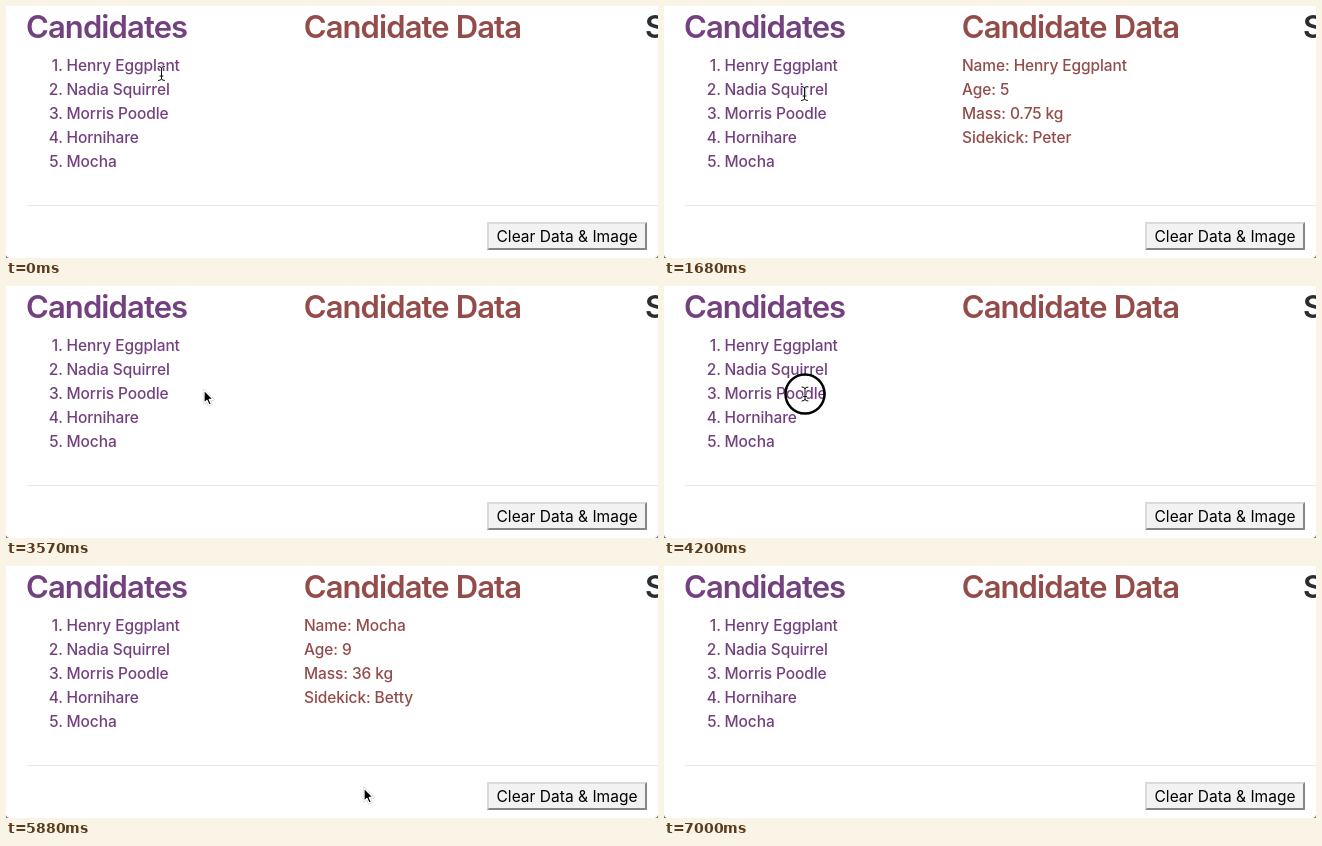
Animation of 652x252 px, one loop 7.35 s. Source, as an HTML page:

```html
<!DOCTYPE html>
<html lang="en">
<head>
<meta charset="utf-8">
<title>Candidates</title>
<style>
  html, body { margin: 0; width: 100%; height: 100%; overflow: hidden; background: #fff; }
  svg { display: block; width: 652px; height: 252px; }
  text { font: 500 15.5px Inter, Roboto, sans-serif; letter-spacing: -.1px; white-space: pre; }
  .head { font-size: 31px; font-weight: 600; letter-spacing: -.9px; }
  .button { font-weight: 400; letter-spacing: .02px; }
  .list { fill: #744180; }
  .data { fill: #944c4a; }
  .num { text-anchor: end; }
</style>
</head>
<body>
<svg viewBox="0 0 652 252" xmlns="http://www.w3.org/2000/svg">
  <rect width="652" height="252" fill="#fff"/>
  <text class="head list" x="20" y="32">Candidates</text>
  <text class="head data" x="297.7" y="32">Candidate Data</text>
  <text class="head" x="638.9" y="32" fill="#2b2e31">S</text>
  <g id="list" class="list"></g>
  <g id="data" class="data"></g>
  <rect x="21" y="199" width="631" height="1" fill="#e8e8e8"/>
  <g>
    <rect x="481" y="216" width="160" height="28" fill="#f2f2f2"/>
    <path id="edgeA" d="M481 244V216H641L639 218H483V242Z"/>
    <path id="edgeB" d="M641 216V244H481L483 242H639V218Z"/>
    <text class="button" x="561" y="236" text-anchor="middle">Clear Data &amp; Image</text>
  </g>
  <path d="M0 249Q.5 251.5 3 252H0ZM652 249Q651.5 251.5 649 252H652Z" fill="#777"/>
  <circle id="ring" r="19.5" fill="none" stroke="#000" stroke-width="2.5"/>
  <g id="arrow" stroke-linejoin="round">
    <path d="M0 0V13.2L3 10.4L5.1 15.2L7.4 14.2L5.3 9.5H9.4Z" fill="none" stroke="#000" stroke-width="2.4" opacity=".2"/>
    <path d="M0 0V13.2L3 10.4L5.1 15.2L7.4 14.2L5.3 9.5H9.4Z" fill="#000" stroke="#fff" stroke-width="1.3"/>
  </g>
  <g id="beam" fill="none" stroke-linecap="round">
    <path d="M-3 -7Q0 -7 0 -5Q0 -7 3 -7M0 -5V5M-3 7Q0 7 0 5Q0 7 3 7M-1.5 2.5H1.5" stroke="#fff" stroke-width="2.6" opacity=".8"/>
    <path d="M-3 -7Q0 -7 0 -5Q0 -7 3 -7M0 -5V5M-3 7Q0 7 0 5Q0 7 3 7M-1.5 2.5H1.5" stroke="#111" stroke-width="1"/>
  </g>
</svg>
<script>
const LOOP = 7350, STEP = 70, END = 7000;
const $ = id => document.getElementById(id);

const names = ['Henry Eggplant', 'Nadia Squirrel', 'Morris Poodle', 'Hornihare', 'Mocha'];
const facts = {
  0: [5, '0.75', 'Peter'],
  1: [126, '113', 'Kitty'],
  2: [4, '15', 'Fred'],
  4: [9, '36', 'Betty']
};

// time at which a candidate's details show; null clears them
const shows = [[0, null], [1260, 0], [1960, 1], [2940, null], [4410, 2], [5530, 4], [6930, null]];

// mouse button held down: from, to, on the Clear button
const presses = [
  [980, 1260], [1750, 1960], [2660, 2940, true],
  [4130, 4410], [5250, 5530], [6650, 6930, true]
];

const ease = {
  in: p => p * p,
  out: p => 1 - (1 - p) ** 2,
  both: p => p * p * (3 - 2 * p)
};

// pointer stops: time, x, y, easing on the way there
const path = [
  [0, 155.5, 67.5],
  [700, 143, 63, 'both'],
  [1470, 143, 63, 'both'],
  [1680, 140.5, 87.5, 'out'],
  [1890, 140.5, 87.5, 'both'],
  [2240, 527, 236, 'both'],
  [2380, 531, 234, 'out'],
  [2870, 531, 234, 'both'],
  [3570, 198, 104, 'both'],
  [3990, 141, 108, 'out'],
  [4410, 141, 108, 'both'],
  [4970, 99.5, 152.5, 'both'],
  [5110, 101, 156, 'out'],
  [5460, 101, 156, 'both'],
  [5880, 358, 222, 'in'],
  [6510, 531, 234, 'out'],
  [END, 531, 234, 'both']
];

function addText(parent, x, y, str, cls) {
  const el = document.createElementNS('http://www.w3.org/2000/svg', 'text');
  el.setAttribute('x', x);
  el.setAttribute('y', y);
  if (cls) el.setAttribute('class', cls);
  el.textContent = str;
  parent.append(el);
  return el;
}

const rowY = i => 65 + 24 * i;
names.forEach((name, i) => {
  addText($('list'), 56.8, rowY(i), i + 1 + '.', 'num');
  addText($('list'), 60.5, rowY(i), name);
});
const lines = [0, 1, 2, 3].map(i => addText($('data'), 298, rowY(i), ''));

function details(id) {
  if (id === null) return ['', '', '', ''];
  const [age, mass, pal] = facts[id];
  return ['Name: ' + names[id], 'Age: ' + age, 'Mass: ' + mass + ' kg', 'Sidekick: ' + pal];
}

function pointer(t) {
  const i = Math.max(1, path.findIndex(k => k[0] >= t));
  const [t0, x0, y0] = path[i - 1], [t1, x1, y1, kind] = path[i];
  const p = ease[kind]((t - t0) / (t1 - t0));
  return [x0 + (x1 - x0) * p, y0 + (y1 - y0) * p];
}

const show = (el, on) => el.setAttribute('visibility', on ? 'visible' : 'hidden');

let shown;
function draw(time) {
  const t = Math.floor((time % LOOP) / STEP) * STEP;
  const id = shows.filter(s => s[0] <= t).pop()[1];
  if (id !== shown) {
    details(id).forEach((str, i) => lines[i].textContent = str);
    shown = id;
  }

  const press = presses.find(p => t >= p[0] && t < p[1]);
  const held = press && press[2];
  $('edgeA').setAttribute('fill', held ? '#868686' : '#dadada');
  $('edgeB').setAttribute('fill', held ? '#dadada' : '#868686');

  const live = t < END;
  const [x, y] = pointer(Math.min(t, END));
  const onText = x < 176 && y > 48 && y < 168;
  for (const el of ['ring', 'arrow', 'beam']) $(el).setAttribute('transform', `translate(${x} ${y})`);
  show($('ring'), live && press);
  show($('arrow'), live && !onText);
  show($('beam'), live && onText);
}

const start = performance.now();
function tick() {
  draw(performance.now() - start);
  requestAnimationFrame(tick);
}
tick();
</script>
</body>
</html>
```
